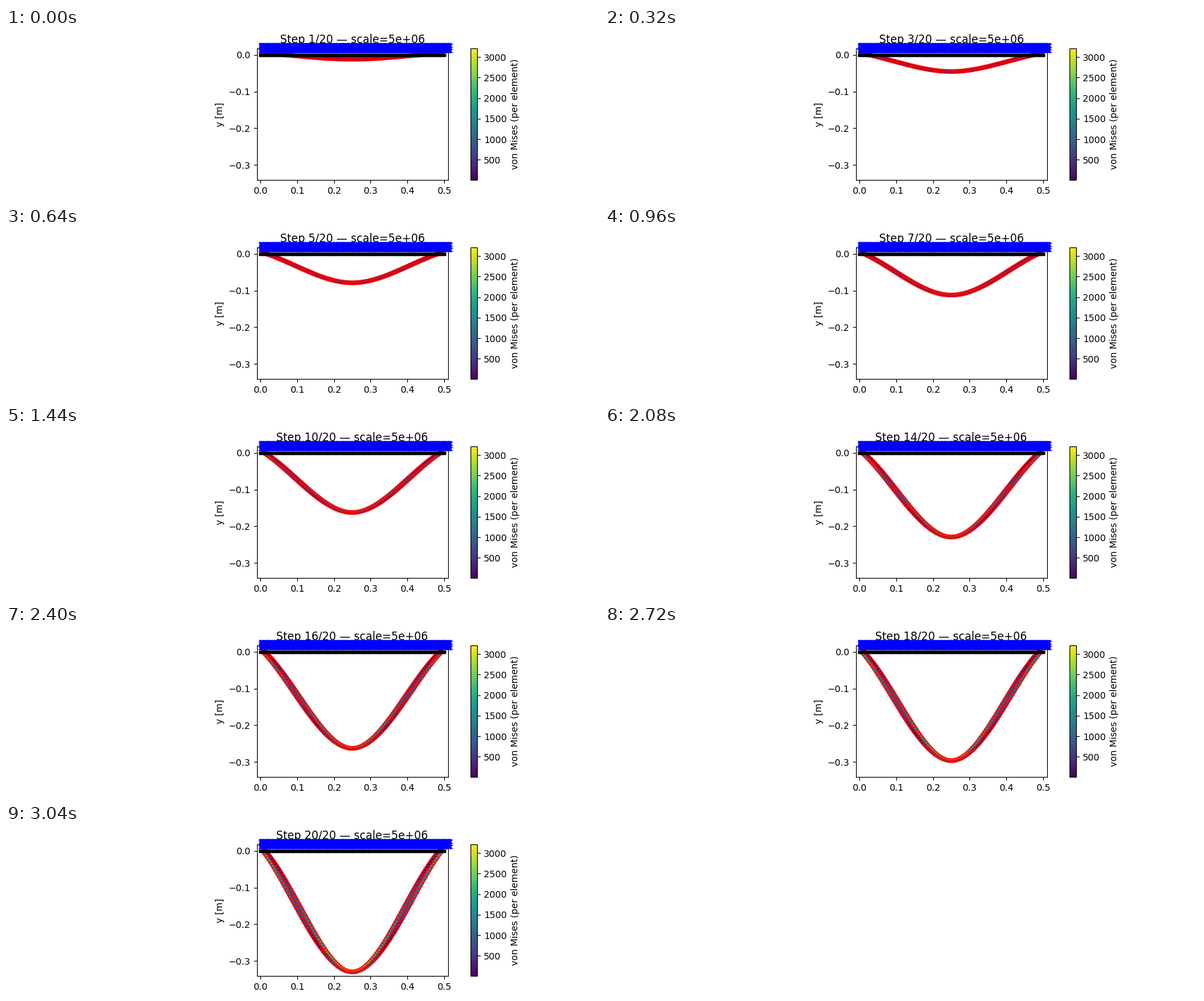
A matplotlib script that plays this animation: 900 px wide and 260 px high, repeating every 3200 ms.

```python
import numpy as np
import matplotlib.pyplot as plt
from matplotlib.animation import FuncAnimation
from matplotlib.cm import ScalarMappable
from matplotlib.collections import LineCollection, PolyCollection
from matplotlib.colors import Normalize

W, H = 900, 260
STEPS = 20
LENGTH, DEPTH = 0.5, 0.01
COLS, ROWS = 100, 2
SAG = 0.335           # scaled midspan deflection at full load
PEAK = 4500           # outer fibre bending stress at full load

fig = plt.figure(figsize=(W / 100, H / 100), dpi=100)


def add_axes(left, right):
    return fig.add_axes([left / W, 0.11, (right - left) / W, 0.77])


ax = add_axes(380.65, 670.5)
ax.set_xlim(-0.01, LENGTH + 0.01)
ax.set_ylim(-0.3417, 0.0175)
ax.set_xticks(np.arange(6) / 10)
ax.set_yticks(np.arange(-3, 1) / 10)
ax.set_ylabel("y [m]")
title = ax.set_title("")

norm = Normalize(6, 3205)
bar = fig.colorbar(ScalarMappable(norm, "viridis"), cax=add_axes(705.375, 715.385))
bar.set_label("von Mises (per element)")

# Beam held at its two lower corners and loaded at midspan:
# a quarter simply supported, three quarters clamped
s = np.linspace(0, 1, COLS + 1)
z = np.linspace(-DEPTH / 2, DEPTH / 2, ROWS + 1)[:, None]
t = np.minimum(s, 1 - s)
bend = 0.25 * t * (3 - 4 * t**2) + 0.75 * t**2 * (3 - 4 * t)
drop = -SAG * bend / bend.max()
slope = np.gradient(drop, s * LENGTH, edge_order=2)
shift = -DEPTH / 2 * slope[0] * (1 - 2 * s) - z * slope

mid_s = (s[1:] + s[:-1]) / 2
mid_z = (z[1:] + z[:-1]) / DEPTH
moment = 1 - 1.6 * np.abs(1 - 2 * mid_s)
stress = PEAK * np.abs(moment * mid_z + 0.2)


def cells(load):
    x = s * LENGTH + load * shift
    y = z + DEPTH / 2 + load * drop
    p = np.stack([x, y], axis=-1)
    quads = np.stack([p[:-1, :-1], p[:-1, 1:], p[1:, 1:], p[1:, :-1]], axis=2)
    return quads.reshape(-1, 4, 2)


mesh = PolyCollection(cells(0), cmap="viridis", norm=norm,
                      edgecolors="red", linewidths=1.0, zorder=2)
ax.add_collection(mesh, autolim=False)

ax.plot(s * LENGTH, 0 * s, "ks", ms=3, clip_on=False, zorder=4)


# Load symbols merge into one band with ragged ends, in stage pixels
def overlay(lines, width):
    flipped = [[(x, H - y) for x, y in line] for line in lines]
    ax.add_collection(LineCollection(flipped, colors="blue", linewidths=width,
                                     capstyle="butt", transform=None,
                                     clip_on=False, zorder=6),
                      autolim=False)


overlay([[(384, 30), (676, 30)]], 10.8)
overlay([[(382.5, y), (677.5, y)] for y in (23.5, 28.5, 31.5, 36.5)], 0.8)
overlay([[(x, 22), (x, 38)] for x in 384.5 + 2.78 * np.arange(105)], 1.0)


def draw(i):
    load = (i + 1) / STEPS
    mesh.set_verts(cells(load))
    mesh.set_array(load * stress.ravel())
    title.set_text(f"Step {i + 1}/{STEPS} — scale=5e+06")
    return mesh, title


anim = FuncAnimation(fig, draw, frames=STEPS, interval=160, repeat=True,
                     repeat_delay=0, blit=False)
plt.show()
```
